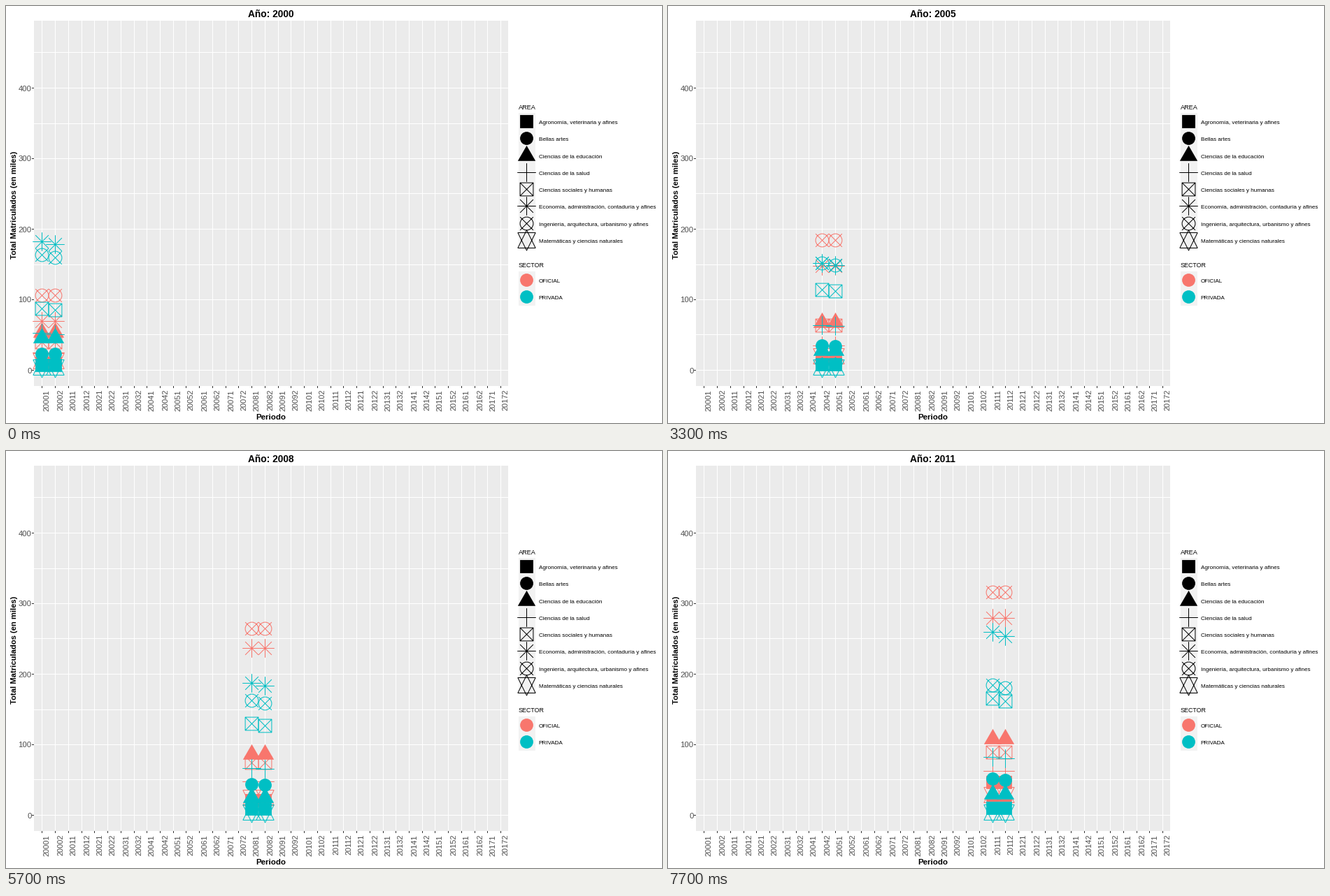
A matplotlib script that plays this animation: 938x597 px, repeating every 8 s.

```python
import numpy as np
import matplotlib.pyplot as plt
from matplotlib.animation import FuncAnimation
from matplotlib.patches import PathPatch, Rectangle
from matplotlib.path import Path

W, H, DPI = 938, 597, 100
PX = 72 / DPI
R = 9.4  # symbol radius
YEAR_COUNT, LAST_STEP = 18, 29

# Colour, and second semester relative to the first
SECTORS = {"OFICIAL": ("#F8766D", 1.0), "PRIVADA": ("#00BFC4", 0.98)}

# Each curve is the polynomial through evenly spaced values, 2000 to 2011:
# area, official sector, private sector
AREAS = [
    ("Agronomía, veterinaria y afines", (10, 17, 19, 47), (7, 10)),
    ("Bellas artes", (11, 22), (23, 51)),
    ("Ciencias de la educación", (53, 72, 108), (46, 26, 30)),
    ("Ciencias de la salud", (25, 38, 62), (52, 63, 65, 82)),
    ("Ciencias sociales y humanas", (40, 61, 72, 89), (87, 111, 125, 165)),
    ("Economía, administración, contaduría y afines",
     (69, 127, 221, 279), (182, 156, 259)),
    ("Ingeniería, arquitectura, urbanismo y afines",
     (106, 166, 250, 316), (163, 153, 184)),
    ("Matemáticas y ciencias naturales", (13, 29), (4, 4)),
]


def curve(values):
    years = np.linspace(0, 11, len(values))
    return np.poly1d(np.polyfit(years, values, len(values) - 1))


CURVES = {sector: [curve(area[column]) for area in AREAS]
          for column, sector in enumerate(SECTORS, start=1)}


def polygon(*points):
    return Path([*points, points[0]], closed=True)


def cross(a, b):
    """Two strokes through the centre, along (a, b) and (-b, a)."""
    return Path([(-a, -b), (a, b), (b, -a), (-b, a)],
                [Path.MOVETO, Path.LINETO] * 2)


def join(*paths):
    return Path.make_compound_path(*paths)


SQUARE = polygon((-1, -1), (1, -1), (1, 1), (-1, 1))
CIRCLE = Path.unit_circle()
TRIANGLE = polygon((0, -1.555), (1.347, 0.778), (-1.347, 0.778))
PLUS = cross(2 ** 0.5, 0)
TIMES = cross(1, 1)
STAR = join(polygon((0, -1.555), (1.347, 1.167), (-1.347, 1.167)),
            polygon((0, 1.555), (1.347, -1.167), (-1.347, -1.167)))
SYMBOLS = [SQUARE, CIRCLE, TRIANGLE, PLUS, join(SQUARE, TIMES),
           join(PLUS, TIMES), join(CIRCLE, TIMES), STAR]
FILLED = 3  # the first three symbols are solid


def x_px(period):
    return 51.4 + 18.735 * period


def y_px(value):
    return 521 - 1.01 * value


fig = plt.figure(figsize=(W / DPI, H / DPI), dpi=DPI, facecolor="white")
ax = fig.add_axes([0, 0, 1, 1])
# Whole coordinates are pixel centres
ax.set(xlim=(-0.5, W - 0.5), ylim=(H - 0.5, -0.5))
ax.axis("off")


def label(x, y, text, size, color="black", **kw):
    return ax.text(x, y, text, fontsize=size * PX, color=color,
                   family="Liberation Sans", va="baseline",
                   rotation_mode="anchor", **kw)


def line(xs, ys, color):
    ax.plot(xs, ys, color=color, lw=PX, snap=False, zorder=0.5,
            solid_capstyle="butt")


def box(x, y, w, h, color):
    ax.add_patch(Rectangle((x, y), w, h, fc=color, lw=0, zorder=0))


def symbol(area, x, y, color):
    solid = area < FILLED
    path = Path(SYMBOLS[area].vertices * R + (round(x), round(y)),
                SYMBOLS[area].codes)
    return ax.add_patch(PathPatch(
        path, fc=color if solid else "none", ec="none" if solid else color,
        lw=0 if solid else PX, snap=False, capstyle="butt",
        joinstyle="miter", zorder=3))


def draw_axes():
    box(39.5, 20.5, 678, 523, "#EBEBEB")
    for value in range(0, 451, 50):
        y = round(y_px(value))
        line([39.5, 717.5], [y, y], "white")
        if value % 100 == 0:
            line([36.5, 39.5], [y, y], "#333333")
            label(36, y + 4, str(value), 11.2, "#4D4D4D", ha="right")
    for period in range(2 * YEAR_COUNT):
        x = round(x_px(period))
        line([x, x], [20.5, 543.5], "white")
        line([x, x], [543.5, 546.5], "#333333")
        label(x + 10.5, 548.5, f"{2000 + period // 2}{period % 2 + 1}", 11,
              "#4D4D4D", rotation=90, ha="right")
    label(378.5, 591, "Periodo", 11.5, weight="bold", ha="center")
    label(15, 284, "Total Matriculados (en miles)", 11.2, weight="bold",
          rotation=90, ha="center")


def draw_legend():
    label(732, 148, "AREA", 9.1)
    label(732, 374, "SECTOR", 8.9)
    keys = [(165 + 24.3 * i, area[0], i, "black")
            for i, area in enumerate(AREAS)]
    keys += [(391.5 + 24.2 * i, name, 1, color)
             for i, (name, (color, _)) in enumerate(SECTORS.items())]
    for y, name, area, color in keys:
        box(732.5, round(y) - 12.5, 24, 25, "#F2F2F2")
        symbol(area, 744, y, color)
        label(761, round(y) + 3.5, name, 8.15)


draw_axes()
draw_legend()
title = label(378, 15.5, "", 13.8, weight="bold", ha="center")
points = []

# Each year snaps to its nearest step; a step in between is half a year
YEARS = np.arange(YEAR_COUNT)
YEAR_STEPS = np.floor(YEARS * LAST_STEP / YEARS[-1] + 0.5)


def update(frame):
    step = max(0, (frame - 1) // 4)
    year = np.interp(step, YEAR_STEPS, YEARS)
    title.set_text(f"Año: {2000 + round(step * YEARS[-1] / LAST_STEP)}")
    while points:
        points.pop().remove()
    for sector, (color, second) in SECTORS.items():
        for area, value_at in enumerate(CURVES[sector]):
            for semester in (0, 1):
                value = value_at(year) * second ** semester
                points.append(symbol(area, x_px(2 * year + semester),
                                     y_px(value), color))
    return [title, *points]


anim = FuncAnimation(fig, update, frames=80, interval=100, repeat=True,
                     repeat_delay=0, blit=False)
plt.show()
```
